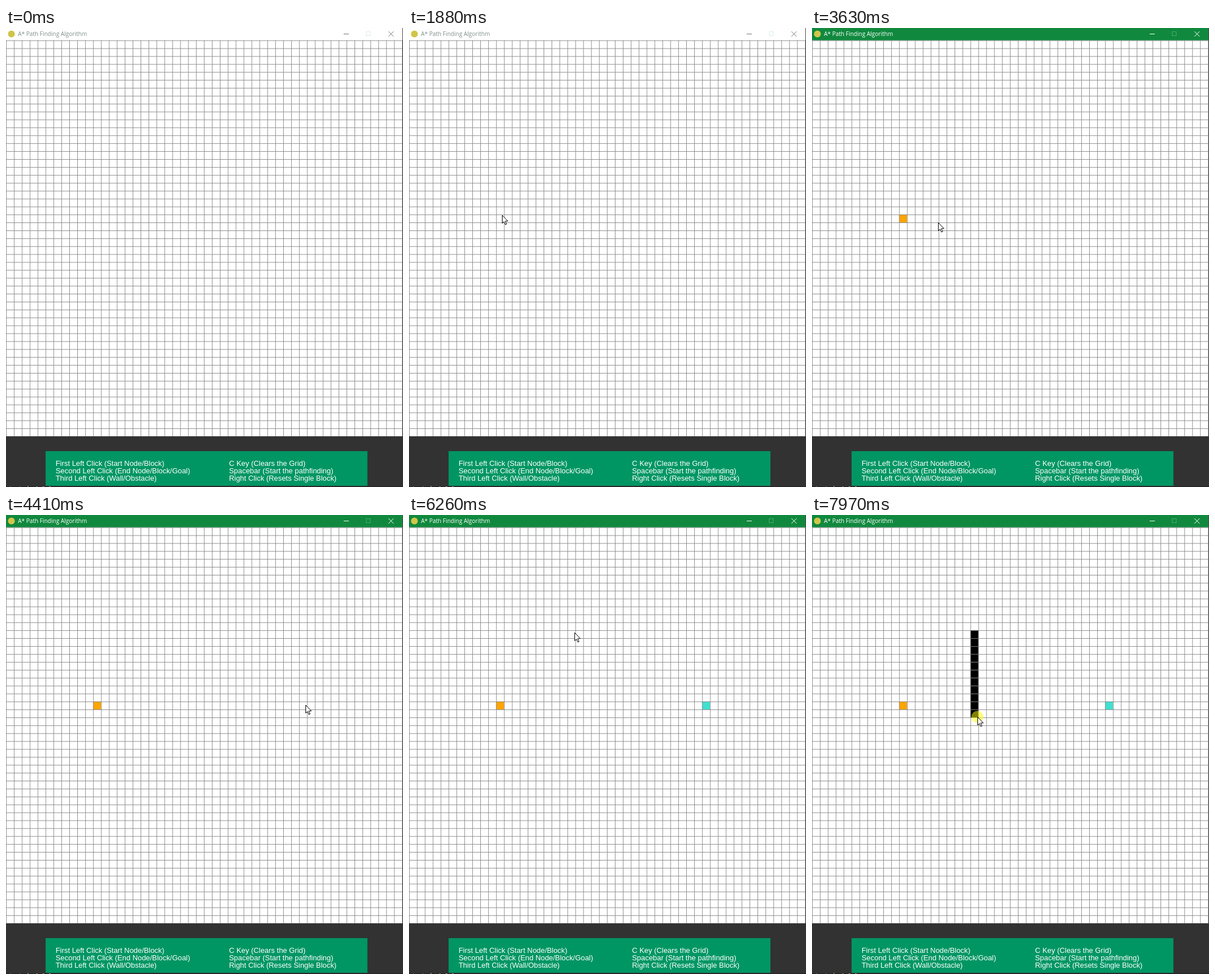
These frames come from a looping animation (696 by 805 pixels, 8 s). An HTML page with a canvas:

```html
<!DOCTYPE html>
<html lang="en">
<head>
<meta charset="utf-8">
<title>A* Path Finding Algorithm</title>
<style>
html, body { margin: 0; width: 696px; height: 805px; overflow: hidden; }
canvas { display: block; }
</style>
</head>
<body>
<canvas id="stage" width="696" height="805"></canvas>
<script>
const ctx = document.getElementById('stage').getContext('2d');
const LOOP = 8000, TICK = 69, LAG = 70, PRESS = 6420;

// The window is shown at a reduced scale; its sizes are whole pixels before scaling
const SCALE = 0.868, CELLS = 50, PITCH = 16 * SCALE, TOP = 25 * SCALE, SIDE = CELLS * PITCH;
const FLOOR = TOP + SIDE;

// Each move continues from the end of the previous one; bow bends the path sideways
const ENTRY = [708, 865];
const easeOut = f => f * (2 - f), easeIn = f => f ** 3;
const moves = [
  { start: 420, end: 1210, to: [189, 353], ease: easeOut },
  { start: 1290, end: 1340, to: [207, 338] },
  { start: 1530, end: 1880, to: [163, 328] },
  { start: 2650, end: 2650, to: [160, 333] },
  { start: 3520, end: 4280, to: [523, 331], bow: [0, 17] },
  { start: 4410, end: 4410, to: [525, 333] },
  { start: 5290, end: 6040, to: [291, 207], bow: [-115, 70] },
  { start: 6260, end: 6260, to: [290, 206] },
  { start: 6330, end: 7000, to: [285, 236], ease: easeIn },
  { start: 7070, end: 7830, to: [286, 343] },
  { start: 7920, end: 7970, to: [290, 354] }
];
const clicks = [[2140, 2260], [2910, 3040], [4540, 4670], [PRESS, LOOP]];

function pointer(t) {
  const i = moves.findLastIndex(m => m.start <= t);
  if (i < 0) return null;
  const { start, end, to, ease = f => f, bow = [0, 0] } = moves[i];
  const from = i ? moves[i - 1].to : ENTRY;
  const gaps = Math.round((end - start) / TICK);
  const step = Math.floor((t - start) / (end - start || 1) * gaps + 1e-6) + 1;
  const f = ease(Math.min(1, step / (gaps + 1)));
  return from.map((v, k) => v + (to[k] - v) * f + bow[k] * Math.sin(Math.PI * f));
}

function rect(color, x, y, w, h) {
  ctx.fillStyle = color;
  ctx.fillRect(x, y, w, h);
}

const cell = (color, col, row) => rect(color, col * PITCH, TOP + row * PITCH, PITCH, PITCH);

function text(str, x, y, color, font) {
  ctx.font = font;
  ctx.fillStyle = color;
  ctx.fillText(str, x, y);
}

function disc(color, x, y, r) {
  ctx.fillStyle = color;
  ctx.beginPath();
  ctx.arc(x, y, r, 0, 7);
  ctx.fill();
}

function titleBar(active) {
  const ink = active ? '#fff' : '#6f7673';
  rect(active ? '#10893e' : '#fff', 0, 0, 696, 22);
  disc('#d0c548', 9.5, 10.5, 6);
  text('A* Path Finding Algorithm', 21, 14, active ? '#fff' : '#7f9088', '10px "Open Sans", sans-serif');
  rect(ink, 592, 10, 9, 1);
  ctx.lineWidth = 1;
  ctx.strokeStyle = active ? '#4aa76c' : '#d9efe4';
  ctx.strokeRect(631.5, 6.5, 7, 7);
  ctx.strokeStyle = ink;
  ctx.stroke(new Path2D('M670.5 6l9 9m0-9l-9 9'));
}

function grid(t) {
  rect('#fff', 0, TOP, 696, SIDE);
  if (t >= 2910) cell('#ffa500', 11, 22);
  if (t >= 4540) cell('#40e0d0', 37, 22);
  if (t >= PRESS) {
    const y = pointer(Math.max(PRESS, t - LAG))[1];
    const last = Math.floor((y - TOP) / PITCH);
    for (let row = 13; row <= last; row++) cell('#000', 20, row);
  }
  for (let i = 0; i <= CELLS; i++) {
    rect('#808080', i * PITCH, TOP, SCALE, SIDE);
    rect('#808080', 0, TOP + i * PITCH, 696, SCALE);
  }
}

function helpPanel(active) {
  rect('#323232', 0, FLOOR, 696, 805 - FLOOR);
  rect('#009664', 80 * SCALE, FLOOR + 30 * SCALE, 650 * SCALE, 70 * SCALE);
  rect('#202020', 0, 804, 696, 1);
  const lines = [
    ['First Left Click (Start Node/Block)', 'C Key (Clears the Grid)'],
    ['Second Left Click (End Node/Block/Goal)', 'Spacebar (Start the pathfinding)'],
    ['Third Left Click (Wall/Obstacle)', 'Right Click (Resets Single Block)']
  ];
  const font = '12.9px "Liberation Sans", Arial, sans-serif';
  lines.forEach((pair, i) => pair.forEach((s, k) => text(s, k ? 391 : 87, 768 + i * 13, '#fff', font)));
  // Tops of a text line just below the window
  text('started: 1.0.0', 0, 810, active ? '#c5d79b' : '#ccc', '9.5px "Liberation Mono", monospace');
}

const arrow = new Path2D('M0 0V14L3 11.2L5.4 16.4L7.6 15.5L5.2 10.4L9.8 10.2Z');

function drawPointer(t) {
  const p = pointer(t);
  if (!p) return;
  const [x, y] = p.map(Math.round);
  if (clicks.some(([down, up]) => t >= down && t < up)) disc('rgba(255,255,0,.5)', x, y, 10.5);
  ctx.save();
  ctx.translate(x + .5, y + .5);
  ctx.fillStyle = '#fff';
  ctx.fill(arrow);
  ctx.strokeStyle = '#000';
  ctx.lineWidth = 1;
  ctx.stroke(arrow);
  ctx.restore();
}

function draw(t) {
  const active = t >= 2140;
  titleBar(active);
  grid(t);
  helpPanel(active);
  rect('#444', 695, 0, 1, FLOOR);
  drawPointer(t);
}

const began = performance.now();
function frame() {
  draw((performance.now() - began) % LOOP);
  requestAnimationFrame(frame);
}
frame();
</script>
</body>
</html>
```
